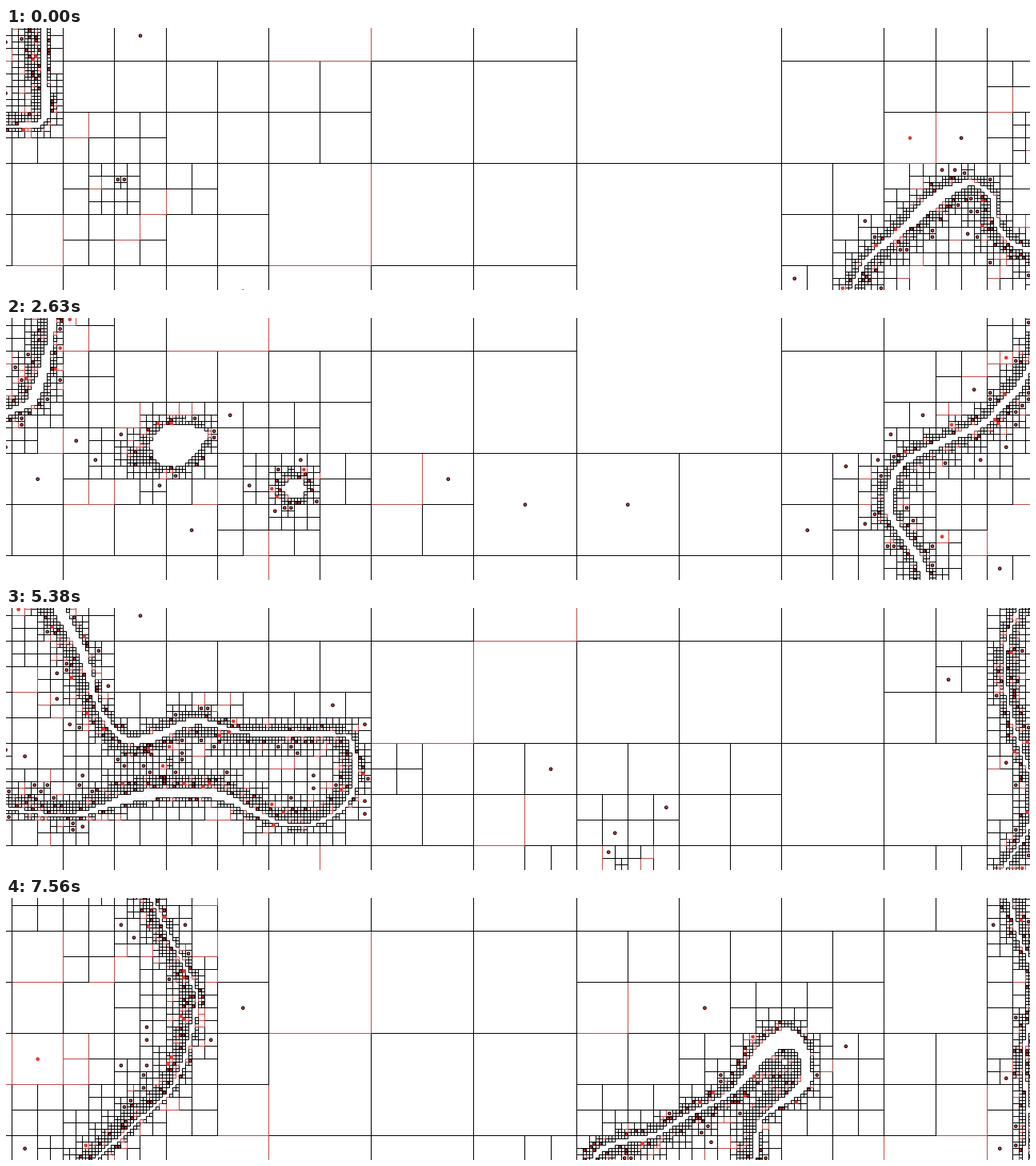
Animation of 1280 by 328 pixels, one loop 7.75 s. Source, as a matplotlib script:

```python
import numpy as np
import matplotlib.pyplot as plt
from matplotlib.animation import FuncAnimation
from matplotlib.collections import PolyCollection
from matplotlib.path import Path

W, H, DPI = 1280, 328, 100
TX, TY = 256.55, 256.0        # root cells of the quadtree
X0, Y0 = -57.05, -86.8
COLS, ROWS, DEPTH = 6, 2, 6
LX, LY = TX / 2 ** DEPTH, TY / 2 ** DEPTH
REACH = 0.8                   # a cell divides if the band is this near, in cell sizes
CALM = 0.45                   # slope of the field inside a loop and around a spot
STEPS, LAST = 62, 60
RED, DOT, INK = "#bd4a48", "#e23b32", "#000000"

GX, GY = np.meshgrid(X0 + LX * (np.arange(COLS << DEPTH) + 0.5),
                     Y0 + LY * (np.arange(ROWS << DEPTH) + 0.5))
POINTS = np.column_stack([GX.ravel(), GY.ravel()])

# corners outside the stage that close an open curve
LEFT = [(-400, -400)]
LEFT_LOW = [(-400, 500), (-400, -400)]
RIGHT = [(1700, 700), (1700, -400)]
BELOW = [(1100, 900)]


def smooth(half, pts, closed=False):
    """Catmull-Rom curve through (x, y) points; a third number sets the half width."""
    p = np.array([(*q, half)[:3] for q in pts], float)
    p = np.vstack([p[-1], p, p[:2]] if closed else [p[0], p, p[-1]])
    t = np.linspace(0, 1, 5, endpoint=False)[:, None]
    out = [b + 0.5 * t * (c - a + t * (2 * a - 5 * b + 4 * c - d
                                       + t * (3 * (b - c) + d - a)))
           for a, b, c, d in zip(p, p[1:], p[2:], p[3:])]
    return np.vstack(out if closed else out + [p[-1:]])


def shore(half, far, *pts):
    return np.vstack([smooth(half, pts), [(x, y, half) for x, y in far]])


def ring(half, *pts):
    return smooth(half, pts, True)


def ellipse(cx, cy, outer, inner):
    """Ring between two ellipses, given by their radii."""
    a = np.linspace(0, 2 * np.pi, 24, endpoint=False)
    (ox, oy), (ix, iy) = outer, inner
    half = np.hypot((ox - ix) * np.cos(a), (oy - iy) * np.sin(a)) / 2
    return np.column_stack([cx + (ox + ix) / 2 * np.cos(a),
                            cy + (oy + iy) / 2 * np.sin(a), half])


def measure(loops, spots):
    """Signed distance to the nearest curve, and its half width there."""
    best = np.full(GX.shape, 1e9)
    half = np.full(GX.shape, 3.0)
    sign = np.ones(GX.shape)
    for loop in loops:
        inside = Path(loop[:, :2]).contains_points(POINTS).reshape(GX.shape)
        sign[inside] *= -1
        for (x, y, w), (x2, y2, w2) in zip(loop, np.roll(loop, -1, 0)):
            dx, dy = x2 - x, y2 - y
            t = np.clip(((GX - x) * dx + (GY - y) * dy)
                        / (dx * dx + dy * dy + 1e-9), 0, 1)
            dist = np.hypot(GX - x - t * dx, GY - y - t * dy)
            near = dist < best
            best = np.where(near, dist, best)
            half = np.where(near, w + t * (w2 - w), half)
    gap = best - half
    gap = np.where((sign < 0) & (gap > 0), CALM * gap, gap)
    for x, y, floor in spots:
        gap = np.minimum(gap, floor + CALM * np.hypot(GX - x, GY - y))
    return sign * (gap + half), half


KEYS = []


def key(step, *loops, spots=()):
    KEYS.append((step, *measure(loops, spots)))


key(0,
    shore(4, LEFT, (46, -40), (47, 50), (50, 100, 6), (42, 118, 5),
          (20, 122, 3), (-40, 123, 3)),
    shore(4, BELOW, (1330, 285), (1285, 279), (1255, 268), (1237, 243),
          (1232, 212), (1208, 195), (1180, 203, 7), (1152, 222, 9),
          (1122, 251, 6), (1072, 296), (1048, 360, 3)),
    spots=[(142, 198, 8), (330, 120, 48), (1290, 138, 9)])

key(14,
    shore(3, LEFT, (84, -40), (68, 0), (38, 55), (0, 90), (-40, 120)),
    ellipse(189, 184, (54, 41), (34, 28)),
    shore(4, RIGHT, (1310, 40), (1262, 108), (1155, 153), (1115, 180),
          (1090, 212), (1087, 245), (1105, 300), (1108, 370)),
    spots=[(350, 214, 10), (450, 210, 45)])

key(27,
    shore(5, LEFT, (54, -40), (57, 40), (85, 90), (90, 115), (85, 140),
          (65, 156), (0, 161, 3), (-40, 161, 3)),
    ellipse(231, 143, (43, 25), (15, 9)),
    ellipse(364, 213, (29, 29), (10, 9)),
    shore(4, RIGHT, (1268, -40, 3), (1253, 45, 3), (1228, 125), (1195, 148),
          (1126, 182), (1113, 215), (1115, 245), (1155, 298), (1185, 370, 6)),
    spots=[(320, 190, 12), (150, 150, 14), (1185, 312, 3)])

key(36,
    shore(6, LEFT, (64, -40), (70, 18), (105, 68), (122, 103, 8), (136, 130, 9),
          (143, 160, 14), (130, 185, 10), (80, 223), (45, 228, 4),
          (0, 205, 4), (-40, 185, 4)),
    ring(4, (165, 160, 13), (175, 138, 9), (200, 120, 6), (230, 114),
         (260, 122), (310, 151), (380, 157), (408, 172), (424, 200), (400, 264),
         (350, 269), (265, 220, 6), (225, 203, 6), (185, 192, 6)),
    shore(3, RIGHT, (1268, -40), (1250, 35), (1249, 100), (1268, 185),
          (1281, 240), (1272, 370)),
    spots=[(210, 60, 16)])

key(43,
    shore(4, LEFT, (58, -40, 8), (66, 0, 8), (95, 55, 6), (112, 115),
          (125, 140), (148, 163, 5), (180, 163, 6), (236, 142, 5), (300, 156, 3),
          (410, 158, 3), (432, 172), (433, 230), (395, 266, 3), (340, 268, 3),
          (275, 238, 6), (240, 231, 7), (190, 232, 7), (145, 240, 6),
          (80, 260, 3), (0, 250, 3), (-40, 245, 3)),
    shore(3, RIGHT, (1282, -40), (1251, 40), (1249, 100), (1267, 175),
          (1281, 215), (1279, 270), (1248, 324), (1230, 360)),
    spots=[(775, 326, 8), (205, 195, 4)])

key(53,
    shore(4, LEFT, (88, -40), (160, 42), (200, 85), (235, 125), (255, 155, 6),
          (258, 185, 8), (248, 212, 8), (225, 236), (150, 277, 3), (75, 297, 3),
          (-40, 302, 3)),
    shore(4, BELOW, (712, 380), (719, 325), (730, 304), (755, 291), (785, 289),
          (815, 292), (838, 303), (858, 321), (880, 380)),
    shore(4, RIGHT, (1258, -40), (1243, 25), (1246, 55), (1266, 115, 3),
          (1268, 185, 3), (1280, 240, 3), (1270, 370, 3)),
    spots=[(785, 292, 8)])

key(60,
    shore(3, LEFT_LOW, (168, -40), (197, 35), (233, 108), (236, 140),
          (210, 232), (152, 290), (105, 335), (90, 380)),
    shore(4, BELOW, (715, 380), (736, 323), (765, 306), (808, 297), (852, 272),
          (900, 247), (923, 225, 6), (940, 200, 10), (960, 181, 12),
          (978, 176, 13), (993, 188, 9), (1000, 210, 6), (996, 235, 7),
          (950, 270), (939, 295), (930, 380)),
    shore(3, RIGHT, (1245, -40), (1263, 40), (1286, 110), (1271, 200),
          (1277, 265), (1270, 370)),
    spots=[(966, 222, 1)])


def pool(a):
    return a[::2, ::2] | a[1::2, ::2] | a[::2, 1::2] | a[1::2, 1::2]


def morton(i, j):
    return sum(((i >> b & 1) << 2 * b) | ((j >> b & 1) << 2 * b + 1)
               for b in range(10))


def cells(step):
    """Corners and sizes, in finest units, of all drawn cells, last branch first."""
    n = max(k for k in range(len(KEYS) - 1) if KEYS[k][0] <= step)
    (s0, d0, w0), (s1, d1, w1) = KEYS[n:n + 2]
    t = (step - s0) / (s1 - s0)
    gap = np.abs(d0 + t * (d1 - d0)) - np.maximum(w0 + t * (w1 - w0), 2.6)

    split = [gap < 0]
    for level in range(DEPTH - 1, -1, -1):
        unit = 1 << DEPTH - level
        centre = gap[unit // 2::unit, unit // 2::unit]
        split.insert(0, pool(split[0]) | (centre < REACH * unit * LY))

    found = []
    for level, divided in enumerate(split):
        leaf = ~divided
        if level:
            leaf &= split[level - 1].repeat(2, 0).repeat(2, 1)
        j, i = np.nonzero(leaf)
        unit = 1 << DEPTH - level
        found.append(np.column_stack([i * unit, j * unit, np.full(len(i), unit)]))
    i, j, unit = np.vstack(found).T
    order = np.argsort(-morton(i, j))
    return i[order], j[order], unit[order]


fig = plt.figure(figsize=(W / DPI, H / DPI), dpi=DPI, facecolor="white")
ax = fig.add_axes([0, 0, 1, 1])
ax.set_xlim(0, W)
ax.set_ylim(H, 0)
ax.axis("off")
px = 72 / DPI
boxes = PolyCollection([], facecolors="none", linewidths=px, snap=True)
ax.add_collection(boxes, autolim=False)
dots = ax.scatter([], [], s=(3.6 * px) ** 2, linewidths=px, zorder=3)


def draw(frame):
    step = min(frame, LAST)
    rng = np.random.default_rng(100 + step)
    i, j, unit = cells(step)
    x, y = X0 + LX * i, Y0 + LY * j
    x2, y2 = x + LX * unit, y + LY * unit
    red = rng.random(len(x)) < 0.1
    dotted = rng.random(len(x)) < 0.1
    boxes.set_verts(np.stack([np.column_stack([x, x2, x2, x]),
                              np.column_stack([y, y, y2, y2])], axis=2))
    boxes.set_edgecolor(np.where(red, RED, INK))
    dots.set_offsets(np.column_stack([x + x2 + 1, y + y2 + 1])[dotted] / 2)
    dots.set_facecolor(DOT)
    dots.set_edgecolor(np.where(red, DOT, INK)[dotted])
    return boxes, dots


anim = FuncAnimation(fig, draw, frames=STEPS, interval=125, repeat=True,
                     repeat_delay=0, init_func=lambda: draw(0), blit=False)
plt.show()
```
